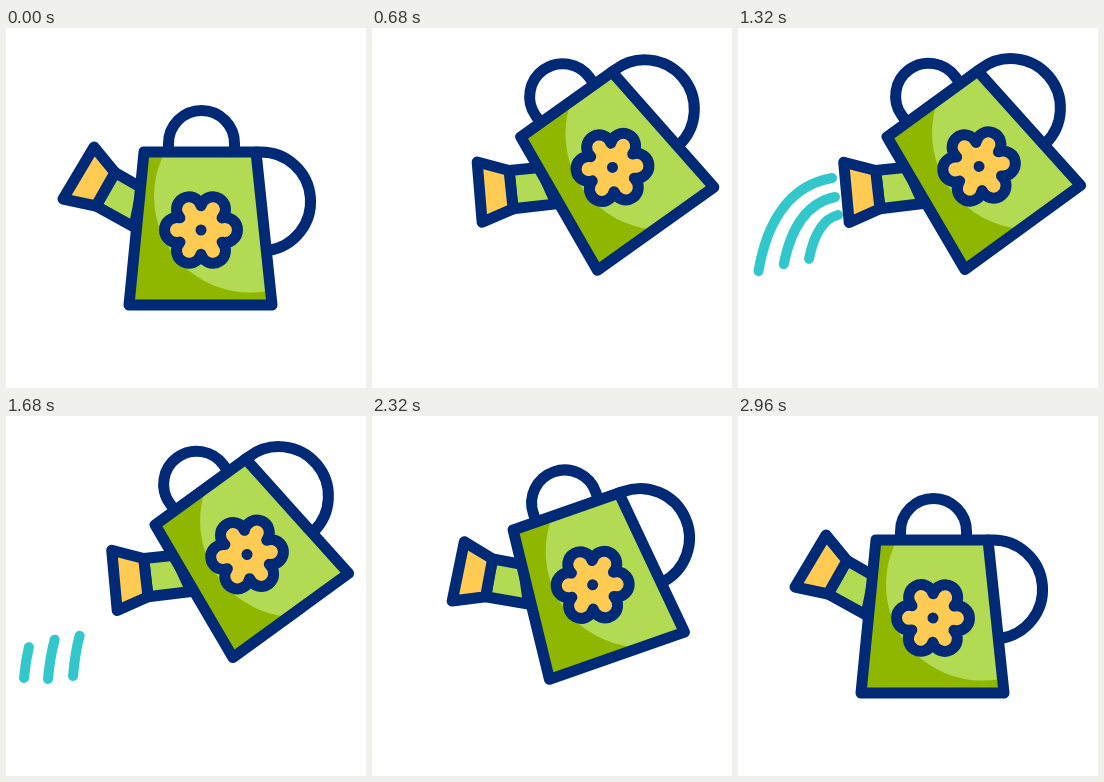
Animation, 360 px wide and 360 px high, one loop 3 s. Source, as an HTML page:

```html
<!DOCTYPE html>
<html lang="en">
<head>
<meta charset="utf-8">
<title>Watering can</title>
<style>
  html, body { margin: 0; width: 100%; height: 100%; overflow: hidden; background: #fff; }
  svg { display: block; width: 100vw; height: 100vh; }
  .line { stroke: #002a76; stroke-width: 11; stroke-linecap: round; stroke-linejoin: round; }
  .drop { fill: none; stroke: #32c8cb; stroke-width: 10; stroke-linecap: round; }
</style>
</head>
<body>
<svg viewBox="0 0 360 360">
  <defs>
    <clipPath id="body"><path d="M138 124H250L266 277H123Z"/></clipPath>
  </defs>
  <g id="water">
    <path class="drop" d="M94 150C48 158 24 200 18 262"/>
    <path class="drop" d="M97 169C64 176 47 208 42 263"/>
    <path class="drop" d="M100 187C80 192 71 216 67 260"/>
  </g>
  <g id="can">
    <path class="line" fill="none" d="M162.5 124V115.5A33 33 0 0 1 228.5 115.5V124"/>
    <path class="line" fill="none" d="M250 124H254A49.5 49.5 0 0 1 262 222.5"/>
    <path class="line" fill="#b2db53" d="M109 144.5L136 160L128 199L90 178Z"/>
    <path class="line" fill="#ffcb53" id="nozzle"/>
    <g clip-path="url(#body)">
      <rect x="110" y="110" width="170" height="180" fill="#90b700"/>
      <circle id="shine" cx="244" cy="168.5" r="96" fill="#b2db53"/>
    </g>
    <path class="line" fill="none" d="M138 124H250L266 277H123Z"/>
    <g id="flower">
      <path class="line" fill="#ffcb53" id="petals"/>
      <circle r="5.5" fill="#002a76"/>
    </g>
  </g>
</svg>
<script>
  const LOOP = 3000, CX = 195, CY = 202;
  const $ = id => document.getElementById(id);
  const can = $('can'), nozzle = $('nozzle'), shine = $('shine'), flower = $('flower');
  const drops = [...document.querySelectorAll('.drop')].map(el => ({ el, len: el.getTotalLength() }));

  // Smooth 0..1 ramp between two times
  const ease = (t, a, b) => {
    const u = Math.min(1, Math.max(0, (t - a) / (b - a)));
    return u * u * (3 - 2 * u);
  };

  // Six round petals meeting at cusps
  const cusp = i => {
    const a = (i * 60 - 30) * Math.PI / 180;
    return (24.3 * Math.cos(a)).toFixed(2) + ' ' + (24.3 * Math.sin(a)).toFixed(2);
  };
  let outline = 'M' + cusp(0);
  for (let i = 1; i <= 6; i++) outline += 'A12.5 12.5 0 1 1 ' + cusp(i);
  $('petals').setAttribute('d', outline + 'Z');

  function draw(t) {
    const tilt = ease(t, 200, 717) - ease(t, 2067, 2600);
    const angle = 36 * tilt;
    can.setAttribute('transform',
      `translate(${36 * tilt} ${-50.5 * tilt}) rotate(${-angle} 180 180)`);
    // The light keeps its direction while the can tilts
    shine.setAttribute('transform', `rotate(${angle} ${CX} ${CY})`);

    const spin = 90 * (ease(t, 200, 1400) - ease(t, 2120, 3000));
    flower.setAttribute('transform', `translate(${CX} ${CY}) rotate(${spin})`);

    const squeeze = ease(t, 733, 960) - ease(t, 967, 1200);
    const dx = 4.5 * squeeze, dy = 2.4 * squeeze;
    nozzle.setAttribute('d',
      `M${88 + dx} ${119 + dy}L109 144.5L90 178L${57 + dx} ${171 + dy}Z`);

    drops.forEach(({ el, len }, i) => {
      const head = len * ease(t, 1050 + i * 30, 1400 + i * 30);
      const tail = len * ease(t, 1400 + i * 38, 1800 + i * 38);
      const size = head - tail;
      el.style.display = size > 0.5 ? '' : 'none';
      el.setAttribute('stroke-dasharray', `${size} ${len * 2}`);
      el.setAttribute('stroke-dashoffset', -tail);
    });
  }

  const start = performance.now();
  function tick() {
    draw((performance.now() - start) % LOOP);
    requestAnimationFrame(tick);
  }
  tick();
</script>
</body>
</html>
```
